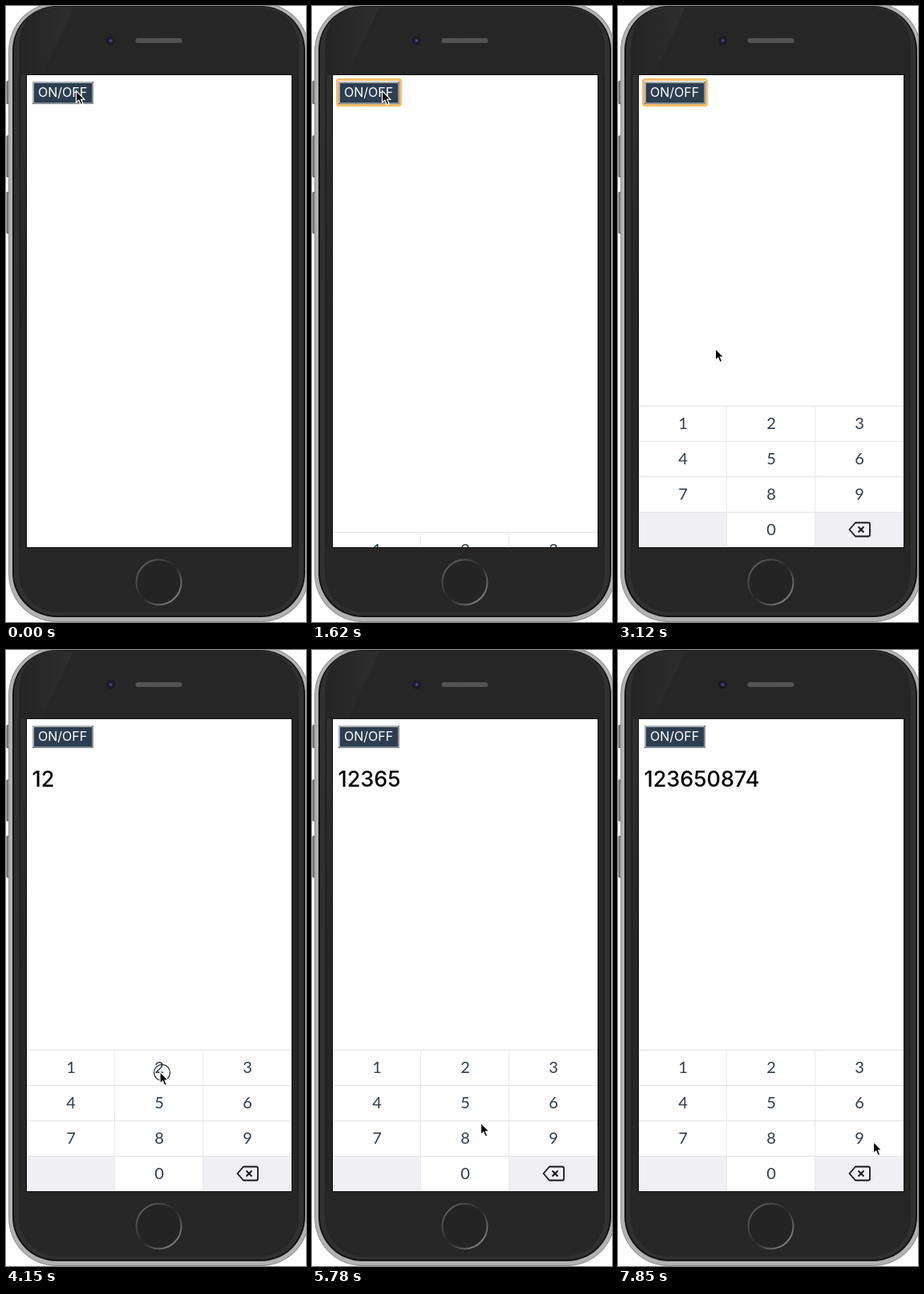
Recreate the animation shown at these times as an HTML page. Size 374x766 px, loop 8000 ms.

```html
<!DOCTYPE html>
<html lang="en">
<head>
<meta charset="utf-8">
<title>Number keyboard</title>
<style>
  html, body { margin: 0; width: 100%; height: 100%; overflow: hidden; background: #fff; }
  svg { display: block; width: 374px; height: 766px; }
  .key { font: 20px Lato, sans-serif; fill: #2c3e50; text-anchor: middle; }
  .label { font: 16px Inter, sans-serif; fill: #fff; }
  .value { font: 500 27px Inter, sans-serif; fill: #000; }
</style>
</head>
<body>
<svg viewBox="0 0 374 766">
  <defs>
    <linearGradient id="shine" x1="0" y1="0" x2="1" y2="0">
      <stop offset="0" stop-color="#242424"/>
      <stop offset="1" stop-color="#2e2e2e"/>
    </linearGradient>
    <linearGradient id="fade" x1="0" y1="0" x2="0" y2="1">
      <stop offset="0" stop-color="#303030"/>
      <stop offset="1" stop-color="#252525"/>
    </linearGradient>
    <linearGradient id="home" x1="0.1" y1="0.1" x2="0.9" y2="0.9">
      <stop offset="0" stop-color="#606060"/>
      <stop offset="0.5" stop-color="#262626"/>
      <stop offset="1" stop-color="#858585"/>
    </linearGradient>
    <pattern id="mesh" width="2" height="2" patternUnits="userSpaceOnUse">
      <rect width="2" height="2" fill="#3c3c3c"/>
      <path d="M0 0h1v1h-1zM1 1h1v1h-1z" fill="#686868"/>
    </pattern>
    <clipPath id="screen"><rect x="26" y="86" width="330" height="587"/></clipPath>
  </defs>

  <!-- phone -->
  <g id="side"></g>
  <rect x="3" y="-4" width="375" height="770" rx="60" fill="#8e8e8e"/>
  <rect x="4" y="-3" width="373" height="768" rx="59" fill="#b2b2b2"/>
  <rect x="8" y="0" width="365" height="760" rx="55" fill="#141414"/>
  <rect x="10" y="1" width="361" height="757" rx="53" fill="#303030"/>
  <rect x="16" y="2" width="349" height="752" rx="48" fill="#262626"/>
  <path d="M62 2H84L44 86H17V50Q17 4 62 2Z" fill="url(#shine)"/>
  <path d="M17 86H25V380L17 400Z" fill="url(#fade)"/>
  <path d="M17.5 86V672M363.5 86V672" stroke="#1a1a1a"/>
  <circle cx="130.500" cy="43" r="5.500" fill="#1b1b1f"/>
  <circle cx="130.500" cy="43" r="3" fill="#29244e"/>
  <circle cx="130.500" cy="43" r="1.200" fill="#5a55a0"/>
  <rect x="161.500" y="40" width="58" height="6" rx="3" fill="url(#mesh)"/>
  <circle cx="190.500" cy="716.500" r="28" fill="#242424" stroke="url(#home)" stroke-width="2"/>
  <rect x="25" y="85" width="332" height="589" fill="#0c0c0c"/>
  <rect x="26" y="86" width="330" height="587" fill="#fff"/>

  <!-- app -->
  <g clip-path="url(#screen)">
    <rect id="ring" x="31.500" y="91.500" width="79" height="32" rx="2" fill="none" stroke="#f6bd6c" stroke-width="3"/>
    <rect x="33" y="94" width="76" height="28" fill="#2c3e50"/>
    <path id="edgeA" d="M34 121V95H108" fill="none" stroke-width="2"/>
    <path id="edgeB" d="M34 121H108V95" fill="none" stroke-width="2"/>
    <text class="label" x="40" y="113">ON/OFF</text>
    <text id="value" class="value" x="32.500" y="169.500"></text>
    <g id="pad"></g>
  </g>

  <circle id="tap" r="10" fill="none" stroke="#111" stroke-width="1.100"/>
  <path id="cursor" d="M0 0V14.500L3.300 11.500L5.700 17L8.300 16L6 10.600H10.300Z"
    fill="#000" stroke="#fff" stroke-width="1.200"/>
</svg>

<script>
const LOOP = 8000, HOLD = 290, LAG = 140;
const $ = id => document.getElementById(id);

function add(parent, tag, attrs, text = '') {
  const el = document.createElementNS('http://www.w3.org/2000/svg', tag);
  for (const k in attrs) el.setAttribute(k, attrs[k]);
  el.textContent = text;
  parent.append(el);
}

// side buttons: top, height
for (const [y, height] of [[93, 29], [161, 52], [231, 52]]) {
  add($('side'), 'rect', { x: 0.5, y, width: 5, height, rx: 1.5, fill: '#5c5c5c' });
  add($('side'), 'rect', { x: 2, y: y + 1, width: 2, height: height - 2, fill: '#8f8f8f' });
}

// keyboard
const pad = $('pad');
[...'123456789 0<'].forEach((key, i) => {
  const x = 26 + i % 3 * 110, y = 497 + Math.floor(i / 3) * 44;
  const fill = /\d/.test(key) ? '#fff' : '#efeff4';
  add(pad, 'rect', { x, y, width: 110, height: 44, fill });
  add(pad, 'path', { d: `M${x} ${y + .5}h110`, stroke: '#e3e3e6' });
  if (i % 3) add(pad, 'path', { d: `M${x - .5} ${y}v44`, stroke: '#e9e9ec' });
  if (/\d/.test(key)) add(pad, 'text', { class: 'key', x: x + 55, y: y + 28.5 }, key);
});
add(pad, 'path', {
  d: 'M296 642.500H312Q314 642.500 314 644.500V657.500Q314 659.500 312 659.500H296L288.500 651ZM299.500 647.500l7 7m0 -7l-7 7',
  fill: 'none', stroke: '#15171a', 'stroke-width': 1.8, 'stroke-linejoin': 'round'
});

// cursor: time, x, y
const moves = [
  [0, 87.5, 105.5], [2970, 97, 270], [3120, 121.5, 426], [3270, 108, 498], [3420, 103, 518],
  [3710, 118, 521], [3860, 168, 524], [4000, 192, 524.5],
  [4300, 210, 523], [4450, 258, 520], [4600, 295, 518],
  [4890, 294, 535], [5040, 288, 558],
  [5340, 244, 560], [5490, 204, 558], [5780, 210.5, 588], [5930, 204, 630], [6080, 200, 643],
  [6380, 203, 624], [6530, 205, 601], [6820, 176, 603], [6960, 121, 604.5], [7110, 103, 602],
  [7410, 103, 572], [7560, 102.5, 558], [7850, 318.5, 611.5]
];
const toggles = [300, 1330, 2220];
const typed = [3420, 4000, 4600, 5040, 5490, 6080, 6530, 7110, 7560];
const digits = '123650874';

// keyboard offset: time, y
const slides = [
  [0, 176], [450, 60], [590, 0],
  [1480, 16], [1620, 157], [1770, 176],
  [2370, 160], [2520, 19], [2670, 0]
];

const at = (table, t) => table.findLast(row => row[0] <= t);
const held = (times, t) => times.some(s => t >= s && t < s + HOLD);
const show = (id, on) => $(id).setAttribute('visibility', on ? 'visible' : 'hidden');

function draw(t) {
  const [, x, y] = at(moves, t);
  $('cursor').setAttribute('transform', `translate(${x} ${y})`);
  $('tap').setAttribute('transform', `translate(${x + 2.5} ${y + 1})`);
  const pressed = held(toggles, t);
  show('tap', pressed || held(typed, t));
  show('ring', t >= 300 && t < typed[0] + LAG);
  $('edgeA').setAttribute('stroke', pressed ? '#747c84' : '#a9adb1');
  $('edgeB').setAttribute('stroke', pressed ? '#a9adb1' : '#898f95');
  pad.setAttribute('transform', `translate(0 ${at(slides, t)[1]})`);
  $('value').textContent = digits.slice(0, typed.filter(s => t >= s + LAG).length);
}

const start = performance.now();
(function tick() {
  draw((performance.now() - start) % LOOP);
  requestAnimationFrame(tick);
})();
</script>
</body>
</html>
```
